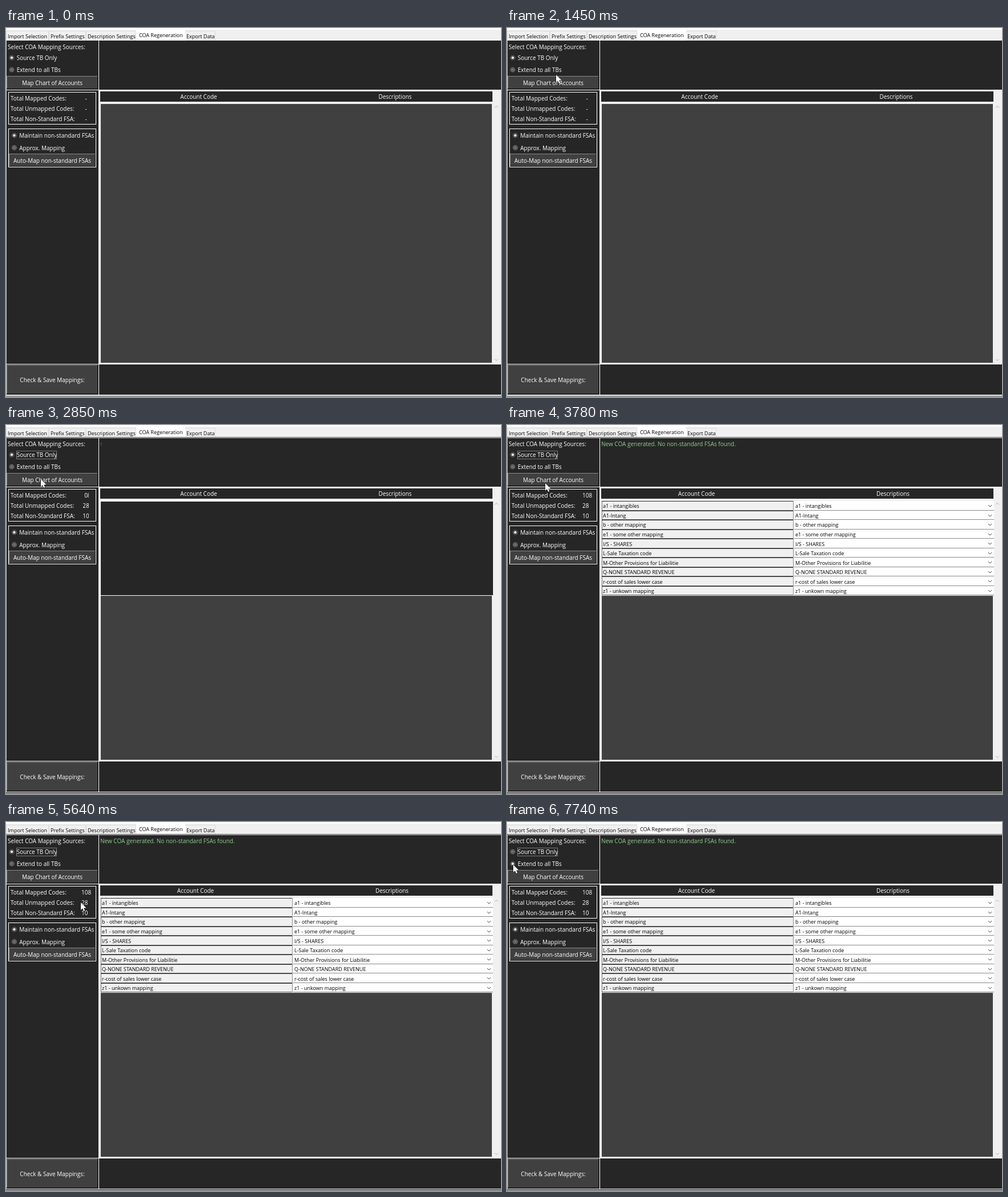
Write an HTML page with a canvas that moves like this. It is 867 by 646 pixels and loops after 8000 ms.

```html
<!DOCTYPE html>
<html lang="en">
<head>
<meta charset="utf-8">
<title>COA Regeneration</title>
<style>
  html, body { margin: 0; width: 100%; height: 100%; overflow: hidden; background: #f0f0f0; }
  canvas { display: block; }
</style>
</head>
<body>
<canvas id="stage" width="867" height="646"></canvas>
<script>
const ctx = document.getElementById('stage').getContext('2d');
const LOOP = 8000, FOCUS = 2720, CLEARED = 2850, FILLED = 2880, SWITCHED = 7700;
const DARK = '#262626', GREY = '#404040', LIGHT = '#f0f0f0', WHITE = '#fff';
const LABEL = 10, SMALL = 9;

const tabs = [['Import Selection', 3, 75], ['Prefix Settings', 78, 140],
  ['Description Settings', 143, 228], ['Export Data', 316, 367]];
const accounts = ['a1 - intangibles', 'A1-Intang', 'b - other mapping', 'e1 - some other mapping',
  'I/S - SHARES', 'L-Sale Taxation code', 'M-Other Provisions for Liabilitie',
  'Q-NONE STANDARD REVENUE', 'r-cost of sales lower case', 'z1 - unkown mapping'];
const totals = [['Total Mapped Codes:', '108'], ['Total Unmapped Codes:', '28'], ['Total Non-Standard FSA:', '10']];

// Pointer tip: time, x, y
const path = [[200, 822, 637], [970, 252, 207], [1020, 244, 200], [1450, 86, 82], [1820, 70, 87],
  [2140, 61, 95], [3480, 61, 95], [3780, 67, 102], [4270, 128, 142], [4430, 139, 147],
  [4680, 139, 147], [4920, 144, 143], [5130, 144, 143], [5640, 131, 141], [5930, 92, 138],
  [6760, 14, 69], [6920, 14, 70], [7240, 11, 74], [7570, 11, 74], [7740, 11, 75]];

function box(x1, y1, x2, y2, fill) {
  ctx.fillStyle = fill;
  ctx.fillRect(x1, y1, x2 - x1, y2 - y1);
}

function outline(x1, y1, x2, y2, color) {
  ctx.strokeStyle = color;
  ctx.lineWidth = 1;
  ctx.strokeRect(x1 + .5, y1 + .5, x2 - x1 - 1, y2 - y1 - 1);
}

function text(str, x, middle, { size = LABEL, color = WHITE, align = 'left' } = {}) {
  ctx.font = `${size}px "Open Sans", "Noto Sans", sans-serif`;
  ctx.fillStyle = color;
  ctx.textAlign = align;
  ctx.fillText(str, x, Math.round(middle + 3.5));
}

function button(label, x1, y1, x2, y2) {
  box(x1, y1, x2, y2, '#1c1c1c');
  box(x1, y1, x2 - 1, y2 - 1, '#8a8a8a');
  box(x1 + 1, y1 + 1, x2 - 1, y2 - 1, GREY);
  text(label, (x1 + x2) / 2, (y1 + y2) / 2 + .5, { align: 'center' });
}

function disc(x, y, r, fill) {
  ctx.beginPath();
  ctx.arc(x, y, r, 0, Math.PI * 2);
  ctx.fillStyle = fill;
  ctx.fill();
}

function radio(label, x, y, on) {
  disc(x, y, 4.3, '#808080');
  disc(x, y, 3.4, on ? '#303030' : '#505050');
  disc(x, y, 2.2, on ? WHITE : '#707070');
  text(label, x + 8.7, y + .5);
}

function chevron(x, y, dir, color) {
  ctx.beginPath();
  ctx.moveTo(x - 3, y - 1.5 * dir);
  ctx.lineTo(x, y + 1.5 * dir);
  ctx.lineTo(x + 3, y - 1.5 * dir);
  ctx.strokeStyle = color;
  ctx.lineWidth = 1;
  ctx.stroke();
}

function drawTabs() {
  box(0, 0, 867, 3, WHITE);
  for (const [label, x, right] of tabs) {
    outline(x - 3, 5, right, 23, '#dcdcdc');
    text(label, x, 14, { size: SMALL, color: '#000' });
  }
  box(228, 3, 314, 22, WHITE);
  text('COA Regeneration', 233, 12.5, { size: SMALL, color: '#000' });
}

function drawTotals(t) {
  outline(4, 112, 158, 169, WHITE);
  totals.forEach(([label, value], i) => {
    const y = 123.5 + 18 * i;
    text(label, 8, y);
    if (t >= FILLED) return text(value, 132, y);
    ctx.save();
    ctx.beginPath();
    ctx.rect(135, y - 8, 10, 16);
    ctx.clip();
    text(t < CLEARED ? '-' : value, 140, y, { align: 'center' });
    ctx.restore();
  });
}

function drawSidebar(t) {
  text('Select COA Mapping Sources:', 3, 33);
  radio('Source TB Only', 10, 52, t < SWITCHED);
  radio('Extend to all TBs', 10, 73, t >= SWITCHED);
  if (t >= FOCUS) {
    ctx.setLineDash([1, 1]);
    outline(18, 45, 89, 60, '#d0d0d0');
    ctx.setLineDash([]);
  }
  button('Map Chart of Accounts', 1, 84, 161, 107);

  drawTotals(t);
  outline(4, 176, 158, 244, WHITE);
  radio('Maintain non-standard FSAs', 14.5, 188, true);
  radio('Approx. Mapping', 14.5, 209.5, false);
  button('Auto-Map non-standard FSAs', 5, 220, 157, 243);

  button('Check & Save Mappings:', 1, 590, 161, 641);
}

function drawRows() {
  box(165, 133, 853, 299, LIGHT);
  accounts.forEach((name, i) => {
    const top = 133.6 + 16.53 * i, y = Math.floor(top), bottom = Math.floor(top + 16.53);
    const style = { size: SMALL, color: '#000' };
    box(166, y, 167, bottom, '#777');
    box(166, y, 502, y + 1, '#303030');
    box(166, bottom - 1, 502, bottom, '#606060');
    box(501, y, 502, bottom, '#999');
    box(503, y, 853, bottom, WHITE);
    box(503, bottom - 1, 853, bottom, '#8a8a8a');
    text(name, 168, top + 8.3, style);
    text(name, 505, top + 8.3, style);
    chevron(846, y + 8.5, 1, '#444');
  });
}

function drawMain(t) {
  if (t >= FILLED) text('New COA generated. No non-standard FSAs found.', 165, 33, { color: '#8fce8f' });
  else if (t >= CLEARED) text('r', 165, 33, { color: '#5a5a5a' });

  box(163, 109, 867, 588, LIGHT);
  const shift = t >= FILLED ? -5.5 : 0;
  box(165, 111, 852, 129, DARK);
  text('Account Code', 337.5 + shift, 120, { align: 'center' });
  text('Descriptions', 681.5 + shift, 120, { align: 'center' });

  box(166, 133, 851, 586, GREY);
  chevron(859, 138, -1, '#b0b0b0');
  chevron(859, 581, 1, '#b0b0b0');
  if (t >= FILLED) drawRows();
  else if (t >= CLEARED) {
    box(165, 133, 853, 299, WHITE);
    box(166, 134, 853, 298, DARK);
  }
}

function drawPanels(t) {
  box(0, 22, 867, 645, DARK);
  box(0, 22, 1, 643, '#d0d0d0');
  box(162, 22, 163, 643, WHITE);
  box(0, 108, 867, 109, WHITE);
  box(0, 588, 867, 589, WHITE);
  box(0, 642, 867, 644, WHITE);
  if (t >= FOCUS) {
    box(0, 21, 867, 22, '#555');
    box(0, 22, 867, 23, '#d0d0d0');
    box(0, 643, 867, 644, '#555');
  }
}

function drawPointer(t) {
  if (t < path[0][0]) return;
  const next = path.findIndex(p => p[0] > t);
  const [t1, x1, y1] = path.at(next < 0 ? -1 : next - 1);
  const [t2, x2, y2] = path.at(next);
  const k = next < 0 ? 0 : (t - t1) / (t2 - t1);
  ctx.save();
  ctx.translate(Math.round(x1 + (x2 - x1) * k), Math.round(y1 + (y2 - y1) * k));
  const arrow = new Path2D('M0 0V13L3 10.3L5.2 15L7.3 14.1L5.2 9.6H9.6Z');
  ctx.strokeStyle = '#000';
  ctx.lineWidth = .9;
  ctx.stroke(arrow);
  ctx.fillStyle = WHITE;
  ctx.fill(arrow);
  ctx.restore();
}

function draw(now) {
  const t = now % LOOP;
  box(0, 0, 867, 646, LIGHT);
  drawTabs();
  drawPanels(t);
  drawSidebar(t);
  drawMain(t);
  drawPointer(t);
  requestAnimationFrame(draw);
}
requestAnimationFrame(draw);
</script>
</body>
</html>
```
